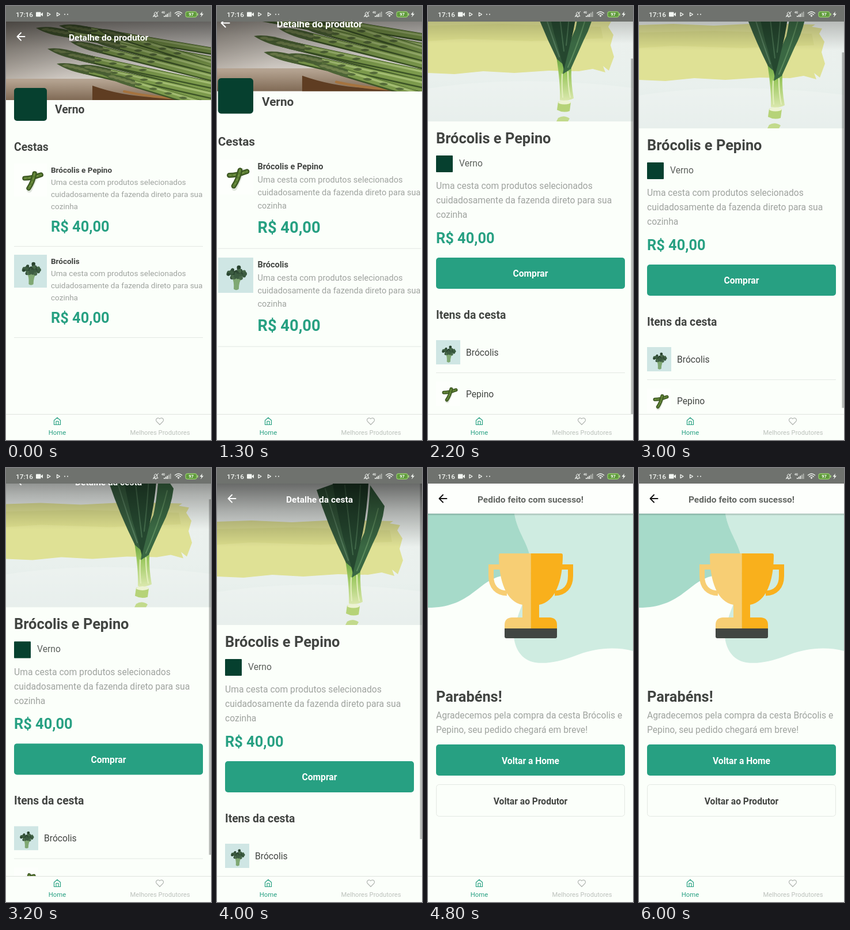
Animation, 356 px wide and 752 px high, one loop 7000 ms. Source, as an HTML page:

```html
<!DOCTYPE html>
<html lang="pt">
<head>
<meta charset="utf-8">
<title>Cestas</title>
<style>
html, body { margin: 0; width: 100%; height: 100%; overflow: hidden; background: #fbfffa; }
svg { display: block; width: 356px; height: 752px; font-family: Roboto, "Noto Sans", sans-serif; }
</style>
</head>
<body>
<svg id="stage" viewBox="0 0 356 752" xmlns="http://www.w3.org/2000/svg"></svg>
<script>
const PAPER = '#fbfffa', DARK = '#414441', GRAY = '#9fa39f', TEAL = '#27a082', LINE = '#e3e8e3';
const SHOP = 'Verno';
const BLURB = ['Uma cesta com produtos selecionados', 'cuidadosamente da fazenda direto para sua', 'cozinha'];

const text = (x, y, size, str, fill = DARK, weight = 400, anchor = 'start') =>
  `<text x="${x}" y="${y}" font-size="${size}" fill="${fill}" font-weight="${weight}" text-anchor="${anchor}">${str}</text>`;
const bold = (x, y, size, str, fill, anchor) => text(x, y, size, str, fill, 700, anchor);
const rect = (x, y, w, h, fill, r = 0, more = '') =>
  `<rect x="${x}" y="${y}" width="${w}" height="${h}" fill="${fill}" rx="${r}" ${more}/>`;
const path = (d, fill, more = '') => `<path d="${d}" fill="${fill}" ${more}/>`;
const line = (d, stroke, width, more = '') =>
  path(d, 'none', `stroke="${stroke}" stroke-width="${width}" stroke-linecap="round" stroke-linejoin="round" ${more}`);
const lines = (x, y, step, size, rows) => rows.map((s, i) => text(x, y + i * step, size, s, GRAY)).join('');
const thumb = (id, x, y, size) => `<use href="#${id}" x="${x}" y="${y}" width="${size}" height="${size}"/>`;
const rule = y => rect(14, y, 328, 1, LINE);

const header = (title, fill, arrow) =>
  line('M32.5 53H19.5M26 46.5L19.5 53L26 59.5', arrow, 1.9) + bold(178, 60.3, 15.5, title, fill, 'middle');

function seeded(seed) {
  return () => (seed = (seed * 16807) % 2147483647) / 2147483647;
}

function broccoli() {
  const rnd = seeded(11);
  let s = rect(0, 0, 56, 56, '#cfe6e4') + path('M21 30Q26 36 25 50Q29 53 33 50Q33 38 39 30Z', '#7fa873');
  for (let i = 0; i < 46; i++) {
    const a = rnd() * 6.28, d = Math.sqrt(rnd());
    const x = 29 + Math.cos(a) * d * 14, y = 23 + Math.sin(a) * d * 9 + Math.abs(Math.cos(a)) * d * 4;
    s += `<circle cx="${x.toFixed(1)}" cy="${y.toFixed(1)}" r="${(2 + rnd() * 1.6).toFixed(1)}" fill="${['#2f4b35', '#3c5c41', '#48694a', '#29432f'][i % 4]}"/>`;
  }
  return s;
}

function cucumber() {
  const one = d => line(d, '#38521f', 8) + line(d, '#587a31', 4.5) + line(d, '#86a352', 1, 'stroke-dasharray="3 4"');
  return rect(0, 0, 56, 56, '#fdfffc') +
    line('M26 45L38 18', '#dfe5dc', 9) + one('M18 25Q30 25 46 19') + one('M35 17Q32 32 25 42');
}

const fade = (id, stops, x2 = 0, y2 = 1) =>
  `<linearGradient id="${id}" x2="${x2}" y2="${y2}">` +
  stops.map(([at, color, alpha = 1]) => `<stop offset="${at}" stop-color="${color}" stop-opacity="${alpha}"/>`).join('') +
  '</linearGradient>';
const clip = (id, h) => `<clipPath id="${id}">${rect(0, 27, 356, h, '#000')}</clipPath>`;

const defs = `<defs>
  <symbol id="broccoli" viewBox="0 0 56 56">${broccoli()}</symbol>
  <symbol id="cucumber" viewBox="0 0 56 56">${cucumber()}</symbol>` +
  fade('shade', [[0, '#000', 0.56], [0.45, '#000', 0.27], [1, '#000', 0]]) +
  fade('wall', [[0, '#a79f95'], [0.45, '#d3cdc6'], [1, '#e6e2dd']], 1, 0.3) +
  fade('table', [[0, '#b9a896'], [1, '#806a55']]) +
  fade('wash', [[0, '#eef1ee'], [0.7, '#e9f0ed'], [1, '#dfe9e6']]) +
  fade('stem', [[0, '#5c9a3c'], [0.45, '#9cc860'], [1, '#dbe8ae']]) +
  fade('drop', [[0, '#000', 0.2], [1, '#000', 0]]) +
  clip('body', 680) + clip('photo', 136) + clip('hero', 245) + '</defs>';

function asparagus() {
  // tip x, tip y, y near the right edge
  const stalks = [[52, 38, 98], [92, 34, 82], [158, 40, 108], [142, 55, 118], [72, 74, 150],
    [98, 82, 142], [88, 100, 168], [126, 103, 160], [168, 118, 182], [112, 62, 130]];
  let s = rect(0, 27, 356, 136, 'url(#wall)') + rect(0, 126, 356, 37, 'url(#table)') +
    path('M150 138Q240 170 356 152V163H150Z', '#5f3d22') + line('M205 148Q280 165 356 158', '#a5733f', 4);
  for (const [x, y, end] of stalks) {
    const dx = 380 - x, k = (end - y) / dx;
    const at = (d, off = 0) => `${x + d} ${(y + k * d + off).toFixed(1)}`;
    s += line(`M${at(46)}L${at(dx)}`, '#3d5527', 13) + line(`M${at(46, -1)}L${at(dx, -1)}`, '#7c9a4c', 10) +
      line(`M${at(50, -3)}L${at(dx, -3)}`, '#a4bd74', 3) +
      path(`M${at(0)}Q${at(22, -9)} ${at(56, -6)}L${at(56, 6)}Q${at(22, 9)} ${at(0)}Z`, '#4d6436');
    for (let d = 9; d < 140; d += d < 50 ? 9 : 26)
      s += path(`M${at(d, 1)}Q${at(d + 7, -5)} ${at(d + 15, -3)}Q${at(d + 8, 4)} ${at(d, 1)}Z`, d < 50 ? '#74854f' : '#556b3a');
  }
  return `<g clip-path="url(#photo)">${s}${rect(0, 27, 356, 104, 'url(#shade)')}</g>`;
}

function leek() {
  const s = rect(0, 27, 356, 245, 'url(#wash)') +
    path('M0 93L60 91L130 94L210 90L306 92L300 96L318 99L313 108L322 122L317 140L323 160L314 184L304 176L308 187L286 181L262 185L210 184L150 188L96 185L46 190L0 188Z', '#dfe195') +
    path('M0 106L130 103L300 108L304 128L180 133L60 129L0 133Z', '#d6d883', 'opacity=".55"') +
    path('M0 215Q160 190 356 214V272H0Z', '#f2f6f3', 'opacity=".5"') +
    path('M223 152L249 180Q248 205 253 232Q241 238 229 235Q230 205 223 160Z', 'url(#stem)') +
    path('M173 38L204 27L238 176L224 164Q192 100 173 38Z', '#355b3d') +
    line('M188 36Q203 90 228 160', '#52795a', 2) +
    path('M266 30L291 66Q287 100 270 132L248 181L234 190Q240 145 256 112Q263 80 266 30Z', '#3a6843') +
    line('M280 70Q268 120 243 178', '#5b8a5c', 2) +
    path('M201 27H263Q260 85 249 130L236 182Q228 150 219 120Q207 70 201 27Z', '#25472f') +
    line('M222 30Q228 85 236 150M249 30Q246 90 240 140', '#42694a', 2) +
    line('M233 190Q232 212 234 230M243 186Q243 212 247 230', '#e4efbd', 2) +
    path('M226 238Q237 233 248 239L246 254Q235 258 224 252Z', '#b6d378') +
    `<ellipse cx="237" cy="239" rx="11" ry="3.5" fill="#edf3d3"/>` +
    path('M226 266Q236 260 246 267L243 272H223Z', '#c2da8c');
  return `<g clip-path="url(#hero)">${s}${rect(0, 27, 356, 110, 'url(#shade)')}</g>`;
}

function basket(y, pic, name) {
  return thumb(pic, 14, y, 57) + bold(78, y + 15.8, 13.5, name) + lines(78, y + 37, 21, 13.52, BLURB) +
    bold(78, y + 118, 25.4, 'R$ 40,00', TEAL) + rule(y + 143);
}

const producer = asparagus() + header('Detalhe do produtor', '#fff', '#fff') +
  rect(14, 142, 57, 57, '#06402f', 5) + bold(85, 186.3, 19.3, SHOP) + bold(14, 250.6, 19.3, 'Cestas') +
  basket(273, 'cucumber', 'Brócolis e Pepino') + basket(431, 'broccoli', 'Brócolis');

const detail = '<g id="scroll">' + leek() + header('Detalhe da cesta', '#fff', '#fff') +
  bold(14, 309.5, 25.4, 'Brócolis e Pepino') + rect(14, 331, 29, 29, '#06402f', 1) +
  text(54, 349.6, 15.66, SHOP, '#5b5f5b') + lines(14, 389.3, 25, 15.66, BLURB) +
  bold(14, 483, 25.4, 'R$ 40,00', TEAL) +
  rect(14, 508, 328, 54, TEAL, 5, 'id="buy"') +
  `<g id="buyText">${bold(178, 541.3, 15.6, 'Comprar', '#fff', 'middle')}</g>` +
  bold(14, 614, 19.3, 'Itens da cesta') +
  thumb('broccoli', 14, 651, 42) + text(66, 678, 15.66, 'Brócolis') + rule(707) +
  thumb('cucumber', 14, 723, 42) + text(66, 750, 15.66, 'Pepino') +
  '</g>' + rect(352.5, 27, 3.5, 616, '#000', 0, 'id="bar"');

function trophy() {
  const half = 'M178.5 148H126Q123 148 123 151C123 196 136 232 164 237V259H145Q133 260 133 272V279H178.5Z';
  const ring = 'M125 171.5H109.5V187C109.5 206 120 216.5 137 217';
  const side = color => path(half, color) + line(ring, color, 9, 'style="stroke-linecap:butt;stroke-linejoin:miter"');
  return side('#f7ce74') + `<g transform="translate(357 0) scale(-1 1)">${side('#f9b01c')}</g>` +
    path('M133 278H224V292Q224 295 221 295H136Q133 295 133 292Z', '#414642');
}

const success =
  path('M150 79H356V317C325 309 292 312 262 323C230 335 208 340 186 337C162 333 150 312 149 290C149 255 182 215 178 165C176 135 156 115 150 79Z', '#cfece1') +
  path('M0 79H150C156 115 176 132 178 163C178 184 150 181 124 188C84 199 72 242 0 242Z', '#a6dac9') +
  trophy() + rect(0, 79, 356, 4, 'url(#drop)') + rect(0, 27, 356, 52, '#fdfffc') +
  header('Pedido feito com sucesso!', '#626662', '#111') +
  bold(14, 405, 25.4, 'Parabéns!') +
  lines(14, 433.5, 25, 15.66, ['Agradecemos pela compra da cesta Brócolis e', 'Pepino, seu pedido chegará em breve!']) +
  rect(14, 479, 328, 54, TEAL, 5) + bold(178, 512.6, 15.6, 'Voltar a Home', '#fff', 'middle') +
  rect(14.5, 548.5, 327, 55, 'none', 5, `stroke="${LINE}"`) + bold(178, 582.5, 15.6, 'Voltar ao Produtor', DARK, 'middle');

const tabs = rect(0, 707, 356, 45, PAPER) + rect(0, 707, 356, 1, '#dfe4df') +
  line('M83.5 718L89 713.3L94.5 718V725.5H83.5ZM87 725.5V719.5H91V725.5', TEAL, 1.2) +
  line('M267 725.5L261.6 720C258.5 716.5 263.5 711.2 267 715.3C270.5 711.2 275.5 716.5 272.4 720Z', '#b4b9b4', 1.2) +
  text(89, 743.4, 11.3, 'Home', TEAL, 400, 'middle') +
  text(267.5, 743.4, 11.2, 'Melhores Produtores', '#bcc1bc', 400, 'middle');

const ICON = '#f4f7f3';
const signal = [0, 1, 2, 3, 4].map(i =>
  rect(274 + i * 2.7, 17 - i * 1.8, 1.7, 2 + i * 1.8, ICON, 0, i > 2 ? 'opacity=".55"' : '')).join('');
const status = rect(0, 0, 356, 27, '#6f726e') + text(17, 18.6, 11.8, '17:16', ICON, 500) +
  rect(52, 10.5, 8.5, 8, ICON, 1) + path('M60 14.5L64 11V18Z', ICON) +
  line('M72 11.5L77 14.5L72 17.5ZM88.5 11.5L93.5 14.5L88.5 17.5Z', ICON, 1.3) +
  rect(101, 13.5, 2, 2, ICON, 1) + rect(106, 13.5, 2, 2, ICON, 1) +
  line('M256 17.5H264L262.5 15.5V12.5Q260 8.5 257.5 12.5V15.5ZM259 19H261M255.5 19L264.5 9.5', ICON, 1) +
  text(270, 13, 5, '4G', ICON, 700) + signal +
  line('M293.5 12.5Q299.5 7.5 305.5 12.5M295.7 15Q299.5 11.7 303.3 15', ICON, 1.4) +
  path('M297.3 16.5Q299.5 14.8 301.7 16.5L299.5 19Z', ICON) +
  rect(312, 9.8, 19, 9.4, '#5f9a3c', 2.5, 'stroke="#a9e779"') + rect(332, 12.5, 1.5, 4, '#a9e779') +
  text(321.5, 17.2, 7.5, '97', '#fff', 700, 'middle') + path('M341 9.5L336.5 15H339.5L338 19.5L343 13.5H340Z', ICON);

const page = (id, content) => `<g id="${id}">${rect(0, 27, 356, 680, PAPER)}${content}</g>`;
const $ = id => document.getElementById(id);
$('stage').innerHTML = defs + rect(0, 0, 356, 752, PAPER) +
  `<g clip-path="url(#body)">${page('producer', producer)}${page('detail', detail)}${page('success', success)}</g>` + tabs + status;

const clamp = x => Math.min(1, Math.max(0, x));
const smooth = x => (x = clamp(x)) * x * (3 - 2 * x);

// Zoom about the middle of the content area
function show(id, alpha, scale) {
  const el = $(id);
  el.style.display = alpha > 0 ? '' : 'none';
  el.setAttribute('opacity', alpha);
  el.setAttribute('transform', `translate(178 367) scale(${scale}) translate(-178 -367)`);
}

const OPEN_DETAIL = 1300, OPEN_SUCCESS = 4600;
const enter = (t, from) => {
  const p = clamp((t - from) / 200);
  return [clamp(p * 1.6), 0.94 + 0.06 * p];
};
const leaveScale = (t, from) => t < from ? 1 : 1.075;

function scrollAt(t) {
  return t < 3000 ? 72 * smooth((t - 1500) / 500) : 60 * (1 - clamp((t - 3000) / 700)) ** 2;
}

function barAlpha(t) {
  const hide = t < 3000 ? 2300 : 4000;
  return 0.27 * (1 - clamp((t - hide) / 250));
}

function draw(t) {
  show('producer', t < OPEN_DETAIL + 200 ? 1 : 0, leaveScale(t, OPEN_DETAIL));
  const [alpha, scale] = enter(t, OPEN_DETAIL);
  show('detail', t < OPEN_SUCCESS + 200 ? alpha : 0, scale * leaveScale(t, OPEN_SUCCESS));
  show('success', ...enter(t, OPEN_SUCCESS));

  const y = scrollAt(t), press = clamp((t - 4100) / 200);
  $('scroll').setAttribute('transform', `translate(0 ${-y})`);
  $('bar').setAttribute('y', 27 + y * 0.89);
  $('bar').setAttribute('opacity', barAlpha(t));
  $('buy').setAttribute('opacity', 1 - 0.45 * press);
  $('buyText').setAttribute('opacity', 1 - 0.4 * press);
}

const start = performance.now();
function tick() {
  const t = (performance.now() - start) % 7000;
  draw(Math.floor(t / 100) * 100); // ten steps a second
  requestAnimationFrame(tick);
}
draw(0);
requestAnimationFrame(tick);
</script>
</body>
</html>
```
